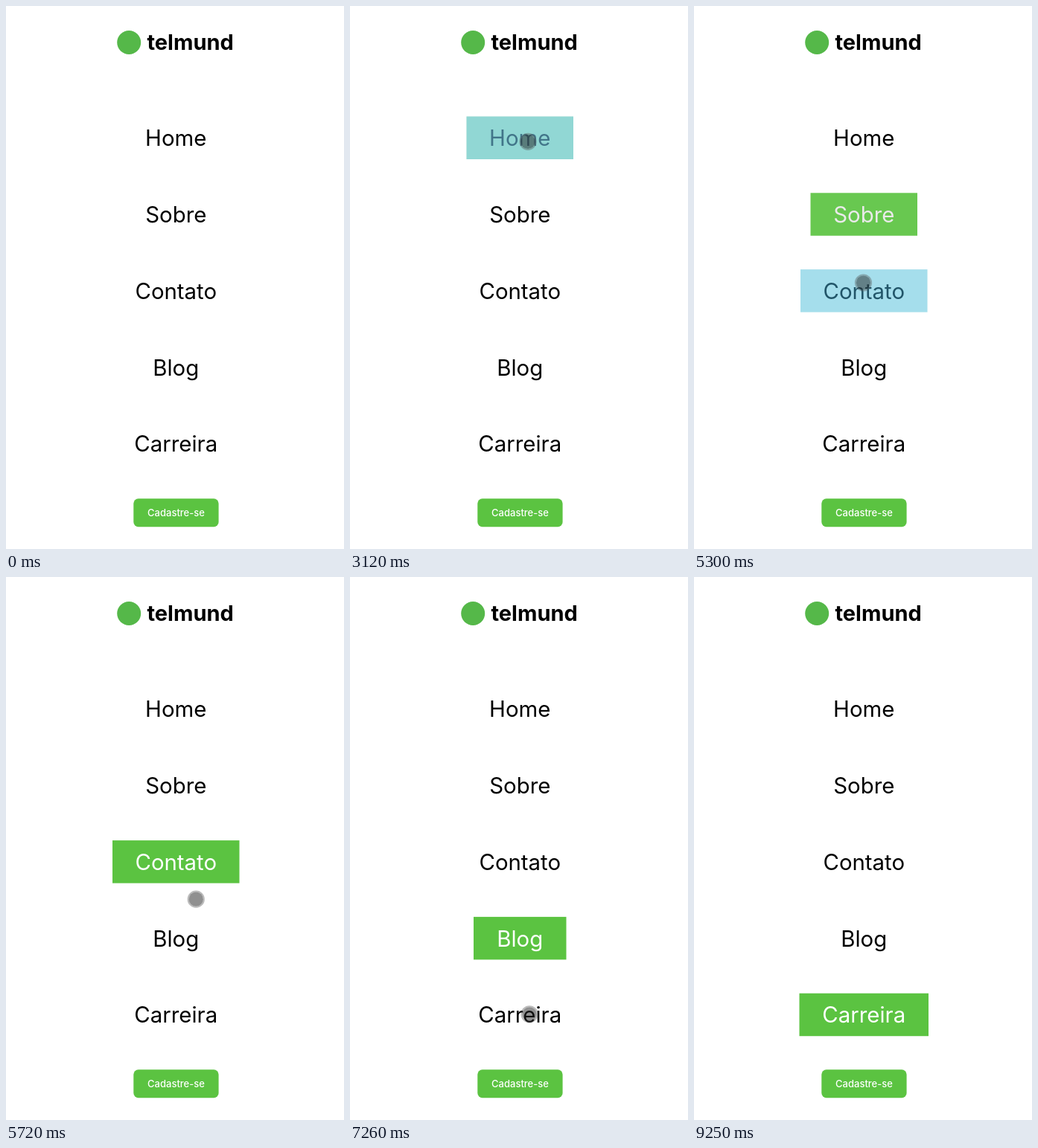
Recreate the animation shown at these times as an HTML page. Size 454 by 730 pixels, loop 9710 ms.

```html
<!DOCTYPE html>
<html lang="pt-BR">
<head>
<meta charset="utf-8">
<title>Menu</title>
<style>
  html, body { margin: 0; width: 100%; height: 100%; overflow: hidden; background: #fff; }
  svg { display: block; width: 454px; height: 730px; font-family: Inter, "Noto Sans", sans-serif; }
  .item text { font-size: 29.4px; text-anchor: middle; }
</style>
</head>
<body>
<svg viewBox="0 0 454 730">
  <circle cx="165.2" cy="49" r="16" fill="#55b849"/>
  <text x="189.5" y="59" font-size="29" font-weight="700">telmund</text>
  <g id="menu"></g>
  <rect x="171.3" y="662.3" width="114.3" height="37.9" rx="6.5" fill="#5bc341"/>
  <text x="228.5" y="686" font-size="13" font-weight="500" fill="#fff" text-anchor="middle">Cadastre-se</text>
  <g id="cursor">
    <circle r="10.6" fill="none" stroke="#555" stroke-opacity=".4" stroke-width="2"/>
    <circle r="9.6" fill="#212121" fill-opacity=".5"/>
  </g>
</svg>
<script>
const LOOP = 9710, FIRST = 130, LAST = 9250, STEP = 68.06;
const FADE = 400, TAP_HOLD = 200, TAP_FADE = 100;
const CENTER = 228.25, ROW_TOP = 148.5, ROW_GAP = 102.8, ROW_HEIGHT = 57.5;

const items = [
  { label: "Home", width: 143.5, tap: 3045 },
  { label: "Sobre", width: 143.5, tap: 4065 },
  { label: "Contato", width: 170.5, tap: 5266 },
  { label: "Blog", width: 124.5, tap: 6341 },
  { label: "Carreira", width: 173.5, tap: 7340 },
];

// One eased glide per stop of the pointer
const glides = [
  { start: 130, span: 1850, d: "M427 722C475 470 480 215 282 146" },
  { start: 2130, span: 590, d: "M282 146Q262 150 239 181" },
  { start: 3100, span: 900, d: "M239 181Q238 225 227 271.5" },
  { start: 4250, span: 900, d: "M227 271.5Q223 325 227.5 372" },
  { start: 5450, span: 800, d: "M227.5 372Q250 415 273.5 482" },
  { start: 6600, span: 650, d: "M273.5 482Q245 540 241 588" },
  { start: 7950, span: 1250, d: "M241 588Q345 610 421 718" },
];

const clamp = v => Math.min(1, Math.max(0, v));

// CSS "ease": cubic-bezier(.25, .1, .25, 1)
function ease(x) {
  if (x <= 0 || x >= 1) return clamp(x);
  const curve = (a, b, s) => 3 * a * s * (1 - s) ** 2 + 3 * b * s * s * (1 - s) + s ** 3;
  let low = 0, high = 1;
  for (let i = 0; i < 20; i++) {
    const mid = (low + high) / 2;
    if (curve(.25, .25, mid) < x) low = mid; else high = mid;
  }
  return curve(.1, 1, low);
}

function make(tag, attrs) {
  const node = document.createElementNS("http://www.w3.org/2000/svg", tag);
  for (const key in attrs) node.setAttribute(key, attrs[key]);
  return node;
}

const menu = document.getElementById("menu");
const cursor = document.getElementById("cursor");

items.forEach((item, row) => {
  const y = ROW_TOP + row * ROW_GAP;
  const box = { x: CENTER - item.width / 2, y, width: item.width, height: ROW_HEIGHT };
  item.fill = make("rect", { ...box, fill: "#5bc341" });
  item.text = make("text", { x: CENTER, y: Math.round(y + 39.7) });
  item.text.textContent = item.label;
  item.flash = make("rect", { ...box, fill: "#33b5e5" });
  const group = make("g", { class: "item" });
  group.append(item.fill, item.text, item.flash);
  menu.append(group);
});

for (const glide of glides) glide.path = make("path", { d: glide.d });

function pointerAt(time) {
  const { start, span, path } = glides.findLast(g => g.start <= time) || glides[0];
  return path.getPointAtLength(path.getTotalLength() * ease((time - start) / span));
}

function draw(now) {
  const clock = now % LOOP;
  // The screen refreshes in even steps
  const time = clock < FIRST ? 0 : FIRST + Math.floor((clock - FIRST) / STEP + .2) * STEP;

  items.forEach((item, i) => {
    const next = items[i + 1];
    const age = time - item.tap;
    const leave = next ? ease((time - next.tap) / FADE) : 0;
    const level = ease(age / FADE) * (1 - leave);
    const grey = Math.round(255 * level);
    item.fill.setAttribute("opacity", level);
    item.text.setAttribute("fill", `rgb(${grey},${grey},${grey})`);
    item.flash.setAttribute("opacity", age < 0 ? 0 : .4 * clamp(1 - (age - TAP_HOLD) / TAP_FADE));
  });

  const { x, y } = pointerAt(time);
  cursor.setAttribute("visibility", clock >= FIRST && clock < LAST ? "visible" : "hidden");
  cursor.setAttribute("transform", `translate(${x} ${y})`);
}

const start = performance.now();
function tick() {
  draw(performance.now() - start);
  requestAnimationFrame(tick);
}
tick();
</script>
</body>
</html>
```
